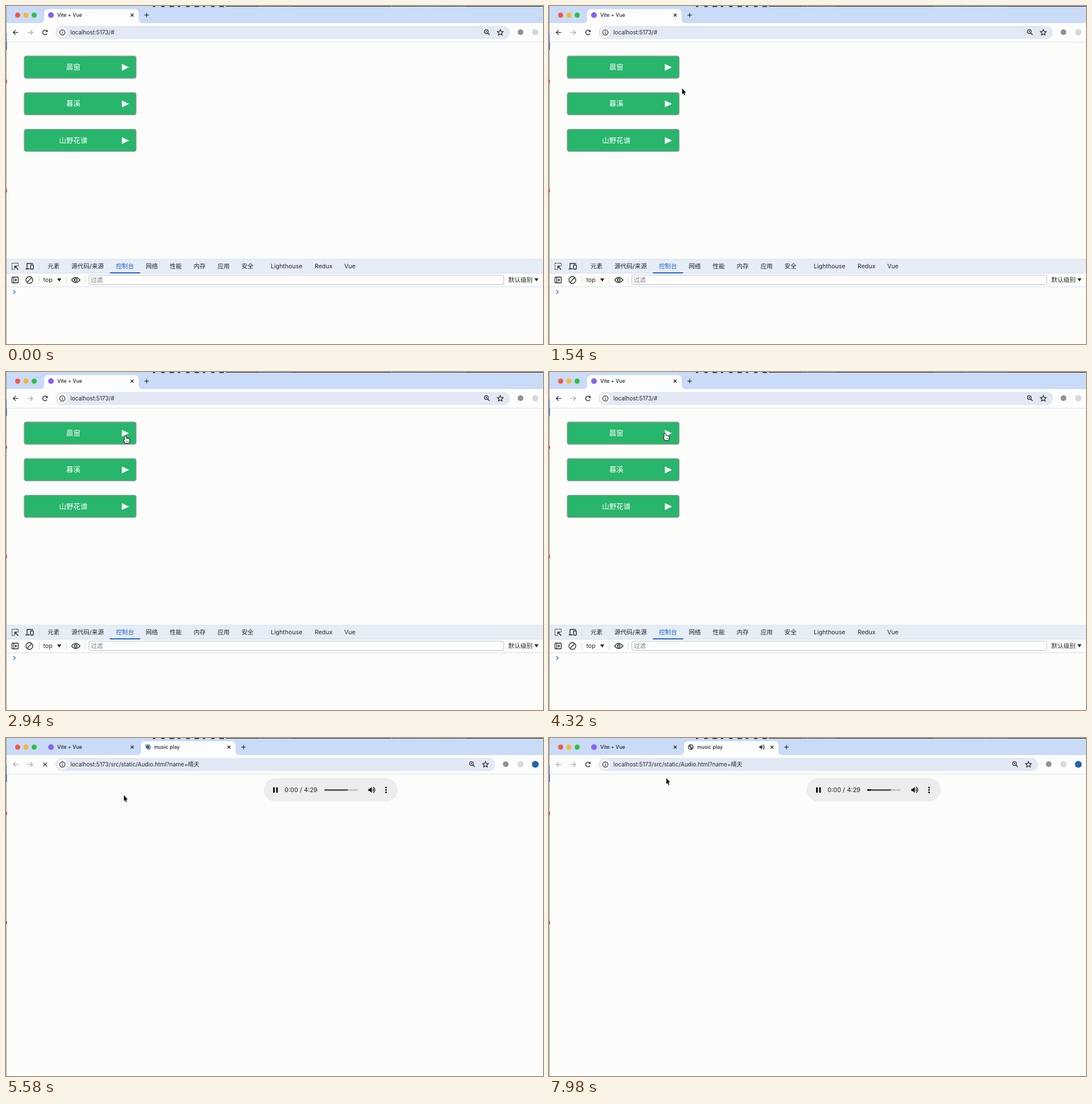
These frames come from a looping animation (943 px wide and 594 px high, 8000 ms). An HTML page with a canvas:

```html
<!DOCTYPE html>
<html lang="zh-CN">
<head>
<meta charset="utf-8">
<title>Music list</title>
<style>
  html, body { margin: 0; width: 100%; height: 100%; overflow: hidden; background: #fdfdfc; }
  canvas { display: block; width: 943px; height: 594px; }
</style>
</head>
<body>
<canvas id="stage"></canvas>
<script>
const W = 943, H = 594, LOOP = 8000;
const HAND_AT = 2500, OPEN_AT = 4640, LOADED_AT = 6300;
const FONT = 'Inter, "Noto Sans CJK SC", "Noto Sans CJK", sans-serif';
const INK = '#24262a', PAPER = '#fcfdfb', BLUE = '#1a62d2', FADED = '#a3a6aa';

const canvas = document.getElementById('stage');
const dpr = window.devicePixelRatio || 1;
canvas.width = W * dpr;
canvas.height = H * dpr;
const c = canvas.getContext('2d');

// Pointer hot spot: time, x, y
const PATH = [
  [840, 478, 560], [1100, 437, 294], [1400, 262, 160], [1640, 214, 134],
  [2080, 210, 121], [2500, 210, 113], [3340, 210, 113], [4080, 204, 108],
  [4640, 204, 108], [5300, 207, 100.5], [6800, 207, 100.5], [7500, 234, 91], [7980, 206, 70.5]
];

function rect(x, y, w, h, fill) {
  c.fillStyle = fill;
  c.fillRect(x, y, w, h);
}

function round(x, y, w, h, r, fill, stroke, lw = 1) {
  c.beginPath();
  c.roundRect(x, y, w, h, r);
  if (fill) { c.fillStyle = fill; c.fill(); }
  if (stroke) { c.strokeStyle = stroke; c.lineWidth = lw; c.stroke(); }
}

function dot(x, y, r, fill) {
  c.beginPath();
  c.arc(x, y, r, 0, 7);
  c.fillStyle = fill;
  c.fill();
}

function arc(x, y, r, color, lw = 1.2, from = 0, to = Math.PI * 2) {
  c.beginPath();
  c.arc(x, y, r, from, to);
  c.strokeStyle = color;
  c.lineWidth = lw;
  c.stroke();
}

function trace(points) {
  c.beginPath();
  for (let i = 0; i < points.length; i += 2) c.lineTo(points[i], points[i + 1]);
}

function line(points, color, lw = 1.2) {
  trace(points);
  c.strokeStyle = color;
  c.lineWidth = lw;
  c.stroke();
}

function shape(points, fill) {
  trace(points);
  c.closePath();
  c.fillStyle = fill;
  c.fill();
}

function at(x, y, draw) {
  c.save();
  c.translate(x, y);
  draw();
  c.restore();
}

// y is the middle of the capitals
function text(s, x, y, size, color = INK, weight = 400, align = 'left') {
  c.font = `${weight} ${size}px ${FONT}`;
  c.textAlign = align;
  c.fillStyle = color;
  c.fillText(s, x, y + size * 0.36);
}

function cross(x, y, r, lw = 1.2) {
  line([x - r, y - r, x + r, y + r], INK, lw);
  line([x + r, y - r, x - r, y + r], INK, lw);
}

function backdrop() {
  rect(0, 0, W, H, PAPER);
  rect(0, 0, W, 30, '#c9dbf7');
  // Sliver of the windows behind
  rect(386, 0, W - 386, 1, '#1d2026');
  for (let i = 0; i < 9; i++) rect(258 + i * 14.6, 0, 4 + i % 3 * 2, 1.6, '#20242b');
  for (let i = 0; i < 14; i++) rect(444 + i * 4.3, 0, 2, 1, '#65605a');
  for (let i = 0; i < 30; i++) rect(676 + i * 4.4, 0, 2, 1, '#596273');
  rect(0, 0, 1, H, '#98999b');
  rect(0, 48, 1.5, 29, '#1e5fd0');
  dot(-2, 132.5, 4, '#dc4437');
  dot(-2, 324.5, 4, '#dc4437');
  ['#f6544e', '#f7b92f', '#2bc142'].forEach((color, i) => dot(20.5 + i * 14.5, 16, 4.5, color));
}

function activeTab(x) {
  const r = x + 166;
  c.beginPath();
  c.moveTo(x - 7, 30);
  c.quadraticCurveTo(x, 30, x, 23);
  c.lineTo(x, 13);
  c.quadraticCurveTo(x, 5.5, x + 8, 5.5);
  c.lineTo(r - 8, 5.5);
  c.quadraticCurveTo(r, 5.5, r, 13);
  c.lineTo(r, 23);
  c.quadraticCurveTo(r, 30, r + 7, 30);
  c.fillStyle = '#fdfdfd';
  c.fill();
}

function plus(x) {
  line([x - 3.8, 16, x + 3.8, 16], INK);
  line([x, 12.2, x, 19.8], INK);
}

function speaker(x, y, s, color) {
  at(x, y, () => {
    c.scale(s, s);
    shape([-6, -2, -3.5, -2, 0, -5.4, 0, 5.4, -3.5, 2, -6, 2], color);
    arc(0.5, 0, 2.4, color, 1.4, -1.1, 1.1);
    arc(0, 0, 5.5, color, 1.3, -1.15, 1.15);
  });
}

function globe(x, y) {
  dot(x, y, 5, '#4d5156');
  shape([x - 3.6, y - 1.2, x - 1, y + 0.4, x - 0.6, y + 3.8, x - 3, y + 2.4], '#f2f3f4');
  shape([x, y - 3.8, x + 3, y - 2, x + 3.5, y + 1, x + 1, y, x - 0.6, y - 1.8], '#f2f3f4');
}

function tabs(t, opened) {
  activeTab(opened ? 237 : 67);
  dot(79, 16, 5, '#8563ee');
  text('Vite + Vue', 90, 15.6, 8.8, INK, 500);
  cross(221.5, 16, 2.5);
  if (!opened) return plus(247);
  if (t < LOADED_AT) {
    const a = t / 160;
    dot(249, 16, 3.3, '#5a5f66');
    arc(249, 16, 4.7, '#3c73c9', 1.2, a, a + 4.2);
  } else {
    globe(249, 16);
    speaker(374, 16, 0.78, INK);
  }
  text('music play', 260, 15.6, 8.8, INK, 500);
  cross(391.5, 16, 2.5);
  plus(417);
}

function arrow(x, dir, color) {
  line([x - 4.5 * dir, 46.5, x + 4.5 * dir, 46.5], color, 1.2);
  line([x, 42.3, x - 4.2 * dir, 46.5, x, 50.7], color, 1.2);
}

function star(x, y) {
  const pts = [];
  for (let i = 0; i < 10; i++) {
    const a = i * Math.PI / 5 - Math.PI / 2, r = i % 2 ? 2.5 : 5.4;
    pts.push(x + r * Math.cos(a), y + r * Math.sin(a));
  }
  trace(pts);
  c.closePath();
  c.strokeStyle = INK;
  c.lineWidth = 1.2;
  c.stroke();
}

function toolbar(t, opened) {
  const dx = opened ? -26 : 0;
  rect(1, 30, W - 1, 33, '#fdfdfd');
  rect(1, 63, W - 1, 1, '#dbe2ee');
  arrow(17, 1, opened ? FADED : INK);
  arrow(42.5, -1, FADED);
  if (opened && t < LOADED_AT) {
    cross(68.5, 46.5, 3.4, 1.2);
  } else {
    arc(68.5, 46.5, 4, INK, 1.4, 0.5, 5.6);
    shape([69, 45.6, 73.2, 45.6, 73.2, 41.4], INK);
  }
  round(87, 35, 798 + dx, 23, 11.5, '#e3e9f4');
  dot(99, 46.5, 9, '#fafbfd');
  arc(99, 46.5, 4.6, INK, 1.2);
  rect(98.4, 46, 1.2, 3, INK);
  rect(98.4, 43.7, 1.2, 1.3, INK);
  text(opened ? 'localhost:5173/src/static/Audio.html?name=晴天' : 'localhost:5173/#', 113, 46.4, 10);

  const zx = 844 + dx;
  arc(zx - 0.5, 45, 3.3, INK, 1.2);
  line([zx + 2, 47.5, zx + 5.2, 50.7], INK, 1.4);
  line([zx - 2, 45, zx + 1, 45], INK, 0.9);
  line([zx - 0.5, 43.5, zx - 0.5, 46.5], INK, 0.9);
  star(868 + dx, 46.7);
  dot(903.5 + dx, 46, 5, '#8e9194');
  dot(929.5 + dx, 46, 5.5, '#d7d8d9');
  if (opened) dot(929.5, 46.3, 6, '#2164ab');
}

function songs() {
  ['晨窗', '暮溪', '山野花谱'].forEach((name, i) => {
    const y = 87.5 + i * 64.3;
    round(32, y + 0.5, 196.5, 39, 3.5, '#28b56c', '#929d98', 1.4);
    text(name, 118.3, y + 20, 12.5, '#fff', 500, 'center');
    shape([203.5, y + 14.3, 216, y + 20.3, 203.5, y + 26.3], '#fff');
  });
}

function triangleDown(x, y) {
  shape([x - 3.7, y - 2.6, x + 3.7, y - 2.6, x, y + 3], INK);
}

function devtools() {
  rect(1, 445, W - 1, 24, '#e7edf7');
  rect(1, 444.5, W - 1, 1, '#d6dfec');
  rect(1, 469, W - 1, 1, '#d3ddec');
  rect(1, 493, W - 1, 1, '#d6e0ee');
  rect(182.5, 468, 53, 2, BLUE);

  // Inspect and device icons
  c.setLineDash([1.5, 1.2]);
  line([21.5, 457, 21.5, 452, 10.5, 452, 10.5, 463, 15, 463], INK, 1.3);
  c.setLineDash([]);
  line([21.5, 463.5, 15.5, 457.3], INK, 1.5);
  line([15.5, 461.5, 15.5, 457.2, 20, 457.2], INK, 1.4);
  line([47.5, 452.5, 37, 452.5, 37, 461.5], INK, 1.4);
  line([34.5, 462, 41.5, 462], INK, 1.6);
  round(43.2, 455, 4.8, 7.5, 1, null, INK, 1.4);

  const labels = [['元素', 73], ['源代码/来源', 115], ['控制台', 193], ['网络', 245.5], ['性能', 287.5],
    ['内存', 329.5], ['应用', 371.5], ['安全', 413.5], ['Lighthouse', 465], ['Redux', 542], ['Vue', 594]];
  for (const [s, x] of labels) text(s, x, 457.3, 10.6, x === 193 ? BLUE : INK, x === 193 ? 500 : 400);

  for (const x of [57.5, 105.5, 138.5]) rect(x, 475, 1, 13, '#d2daea');
  rect(57.5, 451, 1, 13, '#ccd6e7');

  round(10.5, 476.5, 11, 10, 1, null, INK, 1.3);
  rect(13, 476.5, 1.2, 10, INK);
  shape([16, 478.8, 19.5, 481.5, 16, 484.2], INK);
  arc(41, 481.5, 6, INK, 1.3);
  line([45, 477.5, 37, 485.5], INK, 1.3);
  text('top', 65.5, 481.5, 10.6);
  triangleDown(93.5, 481.3);

  c.beginPath();
  c.moveTo(115, 481.5);
  c.quadraticCurveTo(122.5, 472.5, 130, 481.5);
  c.quadraticCurveTo(122.5, 490.5, 115, 481.5);
  c.strokeStyle = INK;
  c.lineWidth = 1.3;
  c.stroke();
  arc(122.5, 481.5, 2.3, INK, 1.4);

  round(145.5, 473, 728.5, 16.5, 3, '#fdfdfd', '#b9c0cb', 1);
  text('过滤', 149, 481.5, 10.6, '#74777c');
  text('默认级别', 882, 481.5, 10.7);
  triangleDown(931.5, 481);
  line([13, 499.5, 16.3, 502.7, 13, 505.9], '#2c6bd6', 1.3);
}

function player(t) {
  round(452.5, 70.5, 235.5, 41, 20.5, '#ecedef');
  rect(469, 86.7, 3, 9.4, '#111');
  rect(474.3, 86.7, 3, 9.4, '#111');
  text('0:00 / 4:29', 489, 91, 11, '#1d1d1d');
  round(559, 90, 58.5, 2.7, 1.3, '#bfc0c2');
  round(559, 90, 41.5, 2.7, 1.3, '#56585a');
  if (t >= LOADED_AT) {
    const played = 6 * Math.min(1, (t - LOADED_AT) / 1000);
    rect(559, 90, played, 2.7, '#080808');
  }
  speaker(642.3, 91.3, 0.98, '#111');
  for (const y of [87, 91.3, 95.6]) dot(667.3, y, 1.5, '#111');
}

function outlined(fill, stroke, lw) {
  c.closePath();
  c.lineJoin = 'round';
  c.strokeStyle = stroke;
  c.lineWidth = lw;
  c.stroke();
  c.fillStyle = fill;
  c.fill();
}

function pointer() {
  trace([0, 0, 0, 10.4, 2.2, 8.4, 3.9, 12.2, 5.4, 11.5, 3.8, 7.8, 6.8, 7.6]);
  outlined('#0a0a0a', '#fff', 1.4);
}

function hand() {
  c.beginPath();
  c.moveTo(-1.4, 7);
  c.lineTo(-1.4, 0.8);
  c.quadraticCurveTo(-0.2, -0.8, 1, 0.8);
  c.lineTo(1, 4);
  c.quadraticCurveTo(2.2, 3, 3.2, 4.5);
  c.quadraticCurveTo(4.4, 3.7, 5.2, 5.1);
  c.quadraticCurveTo(7, 4.7, 7, 6.6);
  c.quadraticCurveTo(7, 9.4, 5.6, 12);
  c.lineTo(0, 12);
  c.quadraticCurveTo(-1.2, 9.8, -3.1, 7.6);
  c.quadraticCurveTo(-3, 5.7, -1.4, 7);
  outlined('#fff', '#111', 1.8);
  for (const x of [1.1, 3.1, 5]) line([x, 7.7, x, 10.3], '#222', 0.6);
}

function cursor(t) {
  if (t < PATH[0][0]) return;
  let i = 0;
  while (i < PATH.length - 2 && t >= PATH[i + 1][0]) i++;
  const [t0, x0, y0] = PATH[i], [t1, x1, y1] = PATH[i + 1];
  const k = Math.min(1, (t - t0) / (t1 - t0));
  at(x0 + (x1 - x0) * k, y0 + (y1 - y0) * k, t >= HAND_AT && t < OPEN_AT ? hand : pointer);
}

function draw(t) {
  const opened = t >= OPEN_AT;
  c.setTransform(dpr, 0, 0, dpr, 0, 0);
  backdrop();
  tabs(t, opened);
  toolbar(t, opened);
  if (opened) {
    player(t);
  } else {
    songs();
    devtools();
  }
  cursor(t);
}

const start = performance.now();
function tick() {
  draw((performance.now() - start) % LOOP);
  requestAnimationFrame(tick);
}
tick();
</script>
</body>
</html>
```
